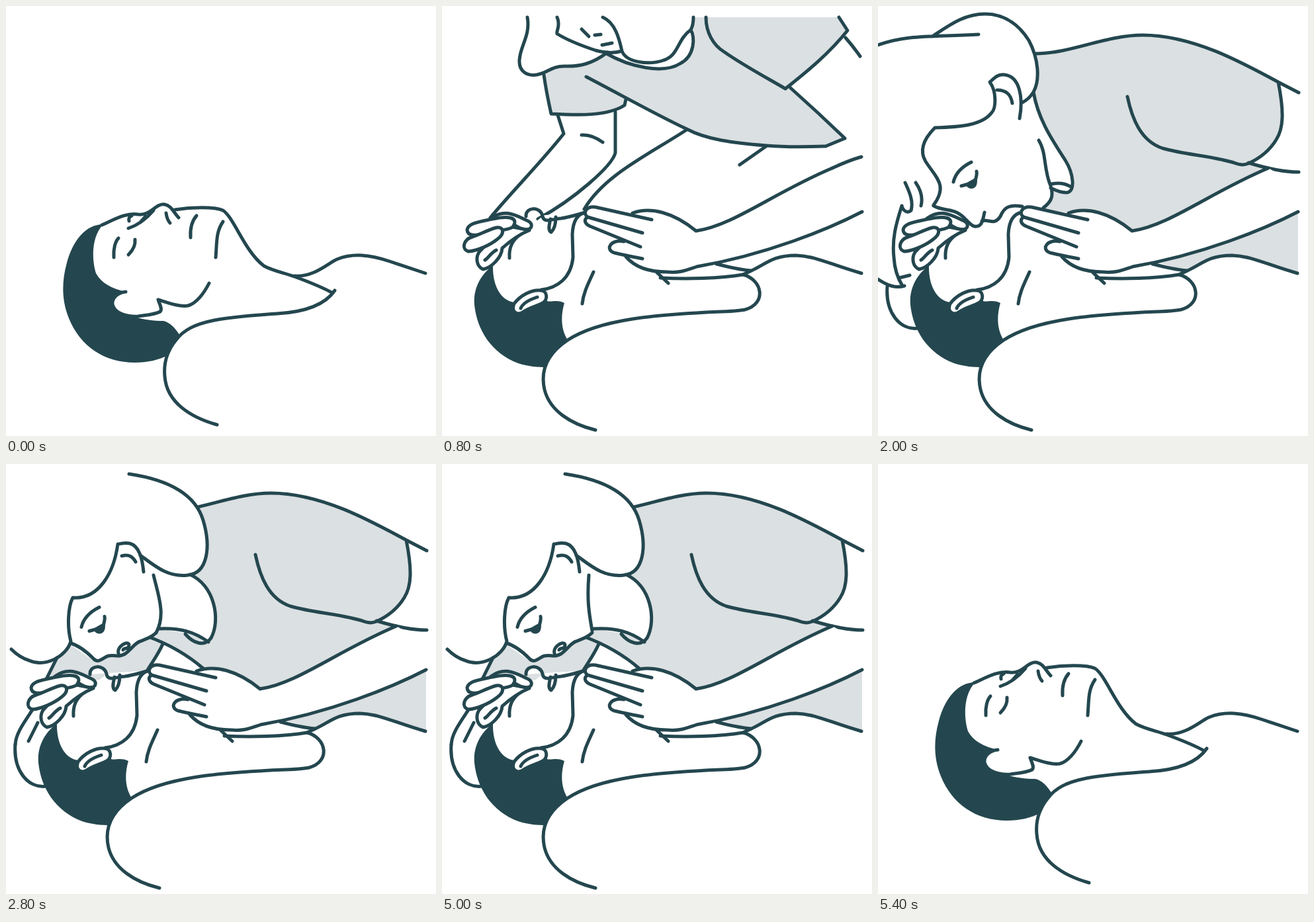
An HTML page for the animation above (7.2 s loop, 650 by 650 pixels).

```html
<!DOCTYPE html>
<html lang="en">
<head>
<meta charset="utf-8">
<title>Rescue breaths</title>
<style>
html, body { margin: 0; width: 100%; height: 100%; overflow: hidden; background: #fff; }
svg { display: block; width: 100vw; height: 100vh; }
path { fill: none; stroke: #24474f; stroke-width: 5; stroke-linecap: round; stroke-linejoin: round; }
.w { fill: #fff; }
.g { fill: #dbe0e2; }
.n { stroke: none; }
.k { fill: #24474f; stroke: none; }
.l { opacity: 0; animation: 7.2s step-end infinite; }

.lie { animation-name: lie; }
.up { animation-name: up; }
.arms { animation-name: arms; }
.palm { animation-name: palm; }
.pinchArm { animation-name: pinchArm; }
.lean { animation-name: lean; }
.tilt { animation-name: tilt; }
.pinch { animation-name: pinch; }
.ready { animation-name: ready; }
.nose { animation-name: nose; }
.blow { animation-name: blow; }
.full { animation-name: full; }
.empty { animation-name: empty; }
.before { animation-name: before; }
.after { animation-name: after; }

@keyframes lie { 0% { opacity: 1 } 8.3333% { opacity: 0 } 72.2222% { opacity: 1 } }
@keyframes up {
  2.7777% { opacity: 1; transform: translate(150px, 0) }
  5.5555% { opacity: 1; transform: none }
  13.8888% { opacity: 0; transform: none }
  72.2222% { opacity: 1; transform: none }
  75% { opacity: 0; transform: none }
}
@keyframes arms {
  2.7777% { opacity: 1; transform: translate(150px, 0) }
  5.5555% { opacity: 1; transform: none }
  8.3333% { opacity: 0; transform: none }
  72.2222% { opacity: 1; transform: none }
  75% { opacity: 0; transform: none }
}
@keyframes palm { 8.3333% { opacity: 1 } 11.1111% { opacity: 0 } }
@keyframes pinchArm { 11.1111% { opacity: 1 } 13.8888% { opacity: 0 } }
@keyframes lean { 13.8888% { opacity: 1 } 72.2222% { opacity: 0 } }
@keyframes tilt { 8.3333% { opacity: 1 } 72.2222% { opacity: 0 } }
@keyframes pinch { 11.1111% { opacity: 1 } 72.2222% { opacity: 0 } }
@keyframes ready {
  13.8888% { opacity: 1 } 22.2222% { opacity: 0 } 38.8888% { opacity: 1 }
  52.7777% { opacity: 0 } 69.4444% { opacity: 1 } 72.2222% { opacity: 0 }
}
@keyframes nose {
  8.3333% { opacity: 1 } 22.2222% { opacity: 0 } 38.8888% { opacity: 1 }
  52.7777% { opacity: 0 } 69.4444% { opacity: 1 } 72.2222% { opacity: 0 }
}
@keyframes blow {
  22.2222% { opacity: 1 } 38.8888% { opacity: 0 }
  52.7777% { opacity: 1 } 69.4444% { opacity: 0 }
}
@keyframes full {
  22.2222% { opacity: 1 } 27.7777% { opacity: 0 }
  52.7777% { opacity: 1 } 58.3333% { opacity: 0 }
}
@keyframes empty {
  27.7777% { opacity: 1 } 38.8888% { opacity: 0 }
  58.3333% { opacity: 1 } 69.4444% { opacity: 0 }
}
@keyframes before {
  13.8888% { opacity: 1 } 22.2222% { opacity: 0 }
  38.8888% { opacity: 1 } 52.7777% { opacity: 0 }
}
@keyframes after { 69.4444% { opacity: 1 } 72.2222% { opacity: 0 } }
</style>
</head>
<body>
<svg viewBox="0 0 650 650">
<defs>
  <clipPath id="stage"><path d="M0 14H638V650H0Z"/></clipPath>
  <g id="hand">
    <path class="w n" d="M152 239L128 218L117 232L138 258L85 266L75 295L62 328L115 345L177 302L186 280Z"/>
    <path d="M180 300C188 292 187 280 183 269C176 254 164 244 152 239C141 233 136 222 129 218C118 213 110 221 116 231C123 242 130 256 138 258C143 266 146 271 149 275M187 280L194 293M134 306C145 311 158 310 165 304"/>
    <path d="M138 258C118 264 98 258 86 266C78 273 80 282 90 283C101 283 108 278 120 277M88 283C76 288 71 299 79 304C89 306 91 295 103 293C108 290 109 285 103 282M79 304C67 305 62 314 66 320C74 326 82 311 98 309L110 302M66 320C60 323 60 331 66 334C80 341 94 336 106 340L115 345M70 320L104 321M76 327C86 325 95 327 102 330"/>
  </g>
  <g id="eye">
    <path d="M114 266C117 253 127 243 141 236"/>
    <path class="k" d="M133 268C138 265 143 262 149 259C152 270 147 277 140 276C135 275 133 272 133 268Z"/>
    <path stroke-width="4" d="M126 272L137 269M149 250C150 255 148 260 147 264"/>
  </g>
</defs>

<g clip-path="url(#stage)">
  <!-- upright rescuer: legs and far arm -->
  <g class="l arms">
    <path d="M224 309C252 256 310 226 370 187M450 240L490 212M549 377C578 360 604 340 629 320"/>
    <path class="w n" d="M175 163L184 193L152 239L180 300L187 313L262 222V160Z"/>
    <path d="M175 165L184 193C171 207 161 223 152 239M262 160V222C255 246 216 286 187 313M211 195C224 194 235 200 243 206"/>
    <use href="#hand"/>
  </g>
  <g class="l palm">
    <path d="M208 310C245 256 310 226 370 187M450 240L490 212"/>
    <path class="w n" d="M175 163L184 193L114 297L150 355L262 222V160Z"/>
    <path d="M175 165L184 193C158 225 135 262 114 297M262 160V222C257 242 205 292 150 340M211 195C224 194 235 200 243 206"/>
    <use href="#hand" transform="translate(-38 58)"/>
  </g>
  <g class="l pinchArm">
    <path d="M215 307C245 256 310 226 370 187M450 240L490 212"/>
    <path class="w n" d="M175 163L184 193L72 320L130 330L262 222V160Z"/>
    <path d="M175 165L184 193C150 236 108 278 73 320M262 160V222C257 242 200 292 145 322M211 195C224 194 235 200 243 206"/>
  </g>

  <!-- upright rescuer: shirt and head -->
  <g class="l up">
    <path class="g n" d="M154 104C165 92 180 91 205 91C220 89 235 80 247 70C290 95 335 102 360 85C380 75 382 48 376 36L380 17H600L613 37L527 124L609 200L577 212C540 214 510 214 490 211C440 207 400 201 370 186L278 141L276 150C245 166 205 165 165 163Z"/>
    <path d="M154 104C157 126 161 145 165 163C205 165 250 167 276 150L278 141M218 107C270 134 325 165 370 186C400 202 440 207 490 211C525 214 552 213 580 212L609 200M527 124C555 149 582 174 609 200M399 17C399 40 410 59 426 69C456 90 490 108 519 125C552 99 585 72 613 37L600 17M610 48C618 57 625 66 632 76"/>
    <path class="w" d="M247 71C285 93 335 103 360 87C382 76 383 47 376 36L272 68Z"/>
    <path class="w n" d="M129 17C134 45 118 60 117 82C116 100 130 106 143 104C161 101 164 91 185 91C208 92 228 87 250 70L272 68C278 85 315 90 335 83C357 75 355 50 376 36L380 14H129Z"/>
    <path d="M129 17C134 45 118 60 117 82C116 100 130 106 143 104C161 101 164 91 185 91C208 92 228 87 250 70M174 17C180 30 172 38 174 42C190 52 214 61 232 67C250 72 262 71 272 68C268 50 262 25 243 17M272 68C278 85 312 90 335 82C358 75 355 51 376 36C379 31 380 24 380 17"/>
    <path stroke-width="4" d="M211 35L222 46M231 44L240 43M242 59L257 56"/>
  </g>
</g>

<!-- leaning rescuer: body -->
<g class="l lean">
  <path class="g n" d="M422 388C490 372 560 345 635 311V404C585 388 565 377 535 377C500 377 490 395 468 400Z"/>
  <path class="g n" d="M239 72C290 72 345 44 400 44C475 44 550 85 605 115C614 160 613 185 602 202C590 222 573 232 560 238L590 245C500 285 440 330 384 340L345 330L245 320L215 261L235 130Z"/>
  <path d="M239 72C290 72 345 44 400 44C475 44 550 85 605 115L636 131M605 115C614 160 613 185 602 202C590 222 573 232 560 238C550 242 545 239 535 236C500 226 465 225 430 215C397 204 384 170 377 137M560 237C586 245 612 251 636 251M14 424C11 463 33 491 61 487"/>
</g>
<g class="l ready">
  <path class="g n" d="M72 298L97 273L132 297L170 289L215 261L237 272L213 313L165 327L60 325Z"/>
  <path class="w n" d="M237 272L298 309L290 318L213 313Z"/>
  <path d="M215 261C245 272 275 289 298 309M237 272C230 288 220 301 213 313M77 293L60 327M39 373C25 394 15 408 14 424M48 391L34 419"/>
</g>

<!-- patient, lying -->
<g class="l lie">
  <path class="w n" d="M145 331C165 322 182 312 200 315C219 317 226 298 240 300C249 302 252 305 255 308C280 304 315 303 328 309C345 320 360 370 390 393L436 409L494 434C480 455 445 463 410 465L257 505L131 410Z"/>
  <path class="k" d="M147 330C120 330 101 355 92 388C84 417 84 445 95 472C112 514 148 539 195 539C215 539 230 535 245 528L264 500C256 486 247 478 238 476C223 476 208 474 195 470C175 468 161 461 161 450C163 440 171 436 181 432C160 427 144 419 136 404C130 385 128 350 147 330Z"/>
  <path class="w" d="M181 432C170 433 160 440 161 451C164 465 183 470 200 469C214 467 226 466 233 462C237 458 232 451 230 444C246 449 262 455 275 453C287 450 299 435 307 419"/>
  <path class="w n" d="M497 432C480 455 445 463 410 465C350 469 285 475 257 505C235 535 240 615 319 633L640 633V434Z"/>
  <path d="M145 331C165 322 182 312 200 315C219 317 226 298 240 300C250 302 252 310 261 320M255 308C280 304 315 303 328 309C345 320 360 370 390 393C405 401 420 403 436 409C455 416 478 425 494 434M436 408C465 410 485 390 500 383C525 373 550 376 580 386L634 404M497 430C480 455 445 463 410 465C370 468 340 470 315 475C285 481 268 490 257 505C243 522 238 540 240 560C243 600 280 622 319 633"/>
  <path d="M242 313C243 320 245 325 248 328M185 336C200 331 212 322 223 309M203 327L211 318M190 317C186 319 185 322 186 325M288 317C281 325 278 335 279 350M328 326C317 342 319 357 317 380M163 380C162 368 165 356 170 351M195 353C196 362 191 370 185 376"/>
</g>

<!-- near arm on the chin -->
<g clip-path="url(#stage)"><g class="l arms">
  <path class="w n" d="M632 196C590 204 575 220 530 230C490 242 460 240 430 240C395 240 384 260 368 283L365 296L341 318L335 338L347 345L385 348C395 357 425 358 445 345C465 332 478 320 489 301L636 268Z"/>
  <path d="M632 196C592 203 575 219 535 230C490 243 455 239 428 241C398 241 382 261 368 283C365 288 365 292 366 297M636 268C588 280 538 290 489 301M490 293C479 318 465 332 445 345C425 359 397 358 385 348"/>
  <path d="M418 266C404 281 394 289 380 293C361 299 344 306 340 324M428 292C406 307 390 312 370 316C350 321 334 327 336 337C339 349 355 342 363 339C383 333 410 333 438 313M443 330C425 343 404 349 387 348C376 344 367 348 355 345"/>
</g></g>

<!-- patient, head tilted back -->
<g class="l tilt">
  <path class="w n" d="M78 398L100 365L130 335L152 318C165 327 190 320 217 312L290 320L400 392L468 400L455 406C482 415 490 447 460 458L400 462L190 505L100 470Z"/>
  <path class="k" d="M77 392C56 408 47 430 49 452C53 490 75 525 115 540C130 545 145 546 159 546L190 505C180 490 179 469 185 449C174 443 165 448 159 446L153 434L112 448C91 448 76 425 77 392Z"/>
  <path class="w" d="M150 430C160 431 160 445 152 449C143 454 131 456 122 463C113 468 104 462 109 450C118 438 135 428 150 430Z"/>
  <path d="M119 457C122 449 132 444 144 440M150 429C175 426 195 411 198 380L197 345C198 323 206 314 217 312M229 402C222 418 214 432 212 450M102 381C101 365 106 356 115 348"/>
  <path class="w" d="M330 411C370 413 420 412 455 406C485 414 491 450 458 459C443 462 420 462 400 463C330 467 240 472 190 505C160 525 148 550 155 580C163 612 195 632 232 641"/>
  <path d="M325 403L342 419M415 390C432 394 450 399 468 400C490 390 500 377 535 377C565 378 585 390 634 404M455 406L468 400"/>
</g>
<g class="l nose">
  <path class="w" d="M127 318C126 304 148 302 152 317C153 329 166 322 180 321C194 319 205 315 217 312M172 319C172 329 170 337 165 342C159 339 163 328 164 322"/>
</g>

<!-- leaning rescuer: head before the breath -->
<g class="l ready">
  <path class="w n" d="M186 15C240 23 285 42 298 85C310 125 305 160 278 167C315 180 326 235 307 268L285 258L230 249C226 262 210 265 203 268L170 289L155 290C147 292 140 302 132 294L97 271L98 255L101 202L60 60Z"/>
  <path d="M186 15C240 23 285 42 298 85C310 125 305 165 275 168C245 172 225 154 203 138M278 167C315 183 325 235 310 263C300 277 283 271 271 257M230 249C263 247 285 254 306 269"/>
  <path d="M208 163C206 144 202 124 187 120C178 118 173 121 169 121C163 165 140 205 101 202C94 215 92 245 98 268C92 290 60 308 35 297C22 293 14 286 8 280M175 139C187 136 192 141 196 148"/>
  <path d="M98 271C112 275 123 285 132 294C140 303 147 292 155 290C165 288 170 293 180 287C190 280 195 270 203 268C213 264 220 262 227 255M170 286C167 277 183 266 186 273C186 281 179 277 177 281"/>
  <use href="#eye" transform="translate(0 -19.5)"/>
</g>
<path class="l before" d="M227 255C242 228 230 198 223 168"/>
<path class="l after" d="M222 168C219 205 222 225 227 252"/>

<!-- leaning rescuer: head during the breath -->
<g class="l blow">
  <path class="w n" d="M82 46C108 29 130 12 162 12C195 12 216 33 228 52C243 80 245 112 235 130C242 172 265 205 283 233C295 252 300 282 284 282L264 280C265 292 258 299 250 305L215 302C198 300 190 306 185 318C175 333 165 320 155 331C142 336 128 313 84 301C103 275 88 258 72 235C62 215 70 200 86 184Z"/>
  <path d="M0 59C45 43 80 47 152 43M82 46C108 29 130 12 162 12C195 12 216 33 228 52C243 80 245 112 235 130C230 138 224 143 218 146M235 130C242 172 265 205 283 233C295 252 300 282 284 282C275 282 267 278 261 275M262 269C272 267 283 268 291 273"/>
  <path d="M214 170C220 138 214 107 192 104C181 102 175 110 169 115C180 130 178 155 172 161C158 180 125 183 86 184C67 203 63 220 72 235C88 260 106 271 84 301M180 127C195 127 201 135 203 147"/>
  <path d="M84 302C99 311 114 304 130 320C140 330 144 336 153 332C159 328 159 319 161 312M157 325C167 321 175 333 185 318C191 303 200 300 218 303"/>
  <use href="#eye"/>
  <path d="M36 302C27 330 21 352 24 380C25 398 30 412 37 423M36 302C38 310 45 314 50 309C54 295 47 280 41 267M57 267C64 277 68 290 65 302M0 413C15 423 27 427 40 423M32 411L48 407"/>
</g>
<path class="l full" d="M243 203C259 223 261 248 263 270C265 288 260 298 250 305"/>
<path class="l empty" d="M243 203C255 222 250 247 261 272C267 290 259 298 250 305"/>

<!-- near arm lifting the chin -->
<g class="l tilt">
  <path class="w n" d="M222 305L232 304L290 313C315 303 350 315 384 340C440 335 500 285 590 245L635 270V311C585 337 490 376 385 394C370 399 365 404 340 402C310 402 290 392 278 378L255 370L256 358L275 354L222 332L217 315Z"/>
  <path d="M288 313C315 303 350 312 384 340C440 332 500 283 590 245M635 311C585 337 490 376 385 394C370 399 360 404 340 402C310 402 290 393 278 379"/>
  <path d="M317 323L232 304C218 302 212 313 220 319L303 343M220 319C213 324 217 330 224 333L300 364M275 356C255 352 246 368 260 373C273 376 288 379 303 382"/>
</g>
<path class="l palm" d="M590 245C605 238 620 232 634 228"/>
<path class="l pinchArm" d="M590 245C605 238 620 232 634 228"/>

<!-- hand pinching the nose -->
<g class="l pinch">
  <path class="w" d="M74 321C95 306 111 316 128 324C138 328 138 338 126 338C118 337 113 333 108 330"/>
  <path class="w" d="M56 372C50 382 53 394 62 398C74 396 90 381 91 366C101 357 115 346 132 339L107 334L88 338Z"/>
  <path d="M65 384C70 381 73 374 82 369"/>
  <path class="w" d="M107 334C117 319 100 317 76 322C57 326 40 328 38 338C38 350 55 346 66 344C85 338 98 340 107 334Z"/>
  <path class="w" d="M46 349C32 353 29 368 40 371C54 370 73 361 83 353C97 343 92 333 82 335C68 339 58 345 46 349Z"/>
</g>
</svg>
</body>
</html>
```
